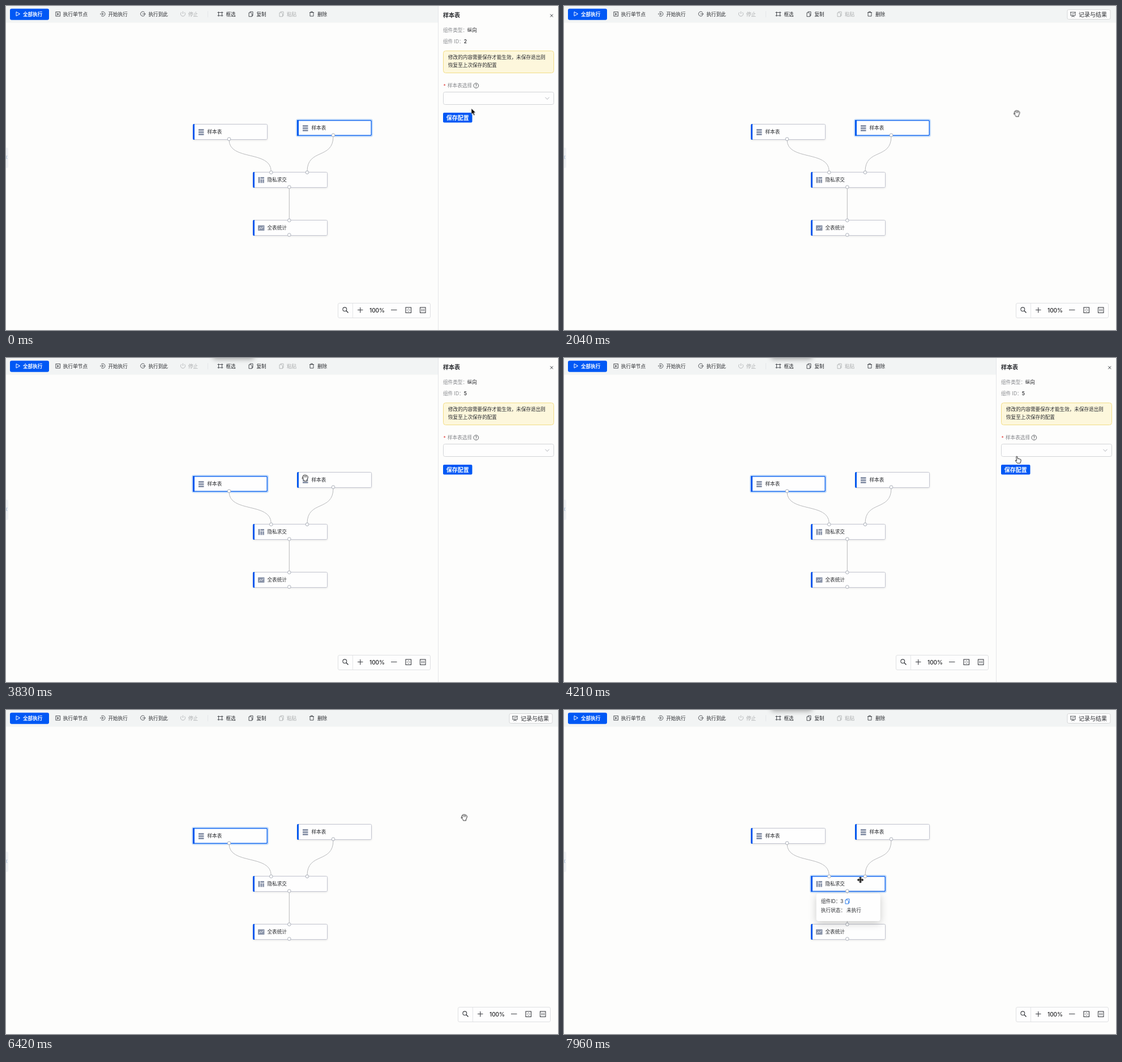
Write an HTML page that moves like this. It is 975 px wide and 574 px high and loops after 8 s.

```html
<!DOCTYPE html>
<html>
<head>
<meta charset="utf-8">
<style>
html, body { margin: 0; width: 100%; height: 100%; overflow: hidden; background: #fdfdfc; }
svg { display: block; }
text { font: 8.6px Inter, "Noto Sans CJK SC", "Noto Sans CJK", sans-serif; fill: #292b2f; }
.bold { font-weight: 600; }
.mid { font-size: 10px; }
.dark { font-weight: 500; fill: #1c1d20; }
.white { fill: #fff; }
.muted { fill: #85878b; }
.line { fill: none; stroke: #3c3f44; }
.off { opacity: .36; }
.edge { fill: none; stroke: #b7b8ba; }
.port { fill: #fff; stroke: #a9aeb8; }
.slate { fill: #8b95aa; }
.card { fill: #fefefe; filter: drop-shadow(0 4px 7px rgba(0, 0, 0, .2)); }
.glow { fill: none; stroke: #c3dcfa; stroke-width: 2; }
.focus { fill: none; stroke: #1a6cf0; stroke-width: 1.5; }

/* 1% of the loop is 80 ms */
svg [class*="a-"] { animation: 8s linear infinite; }
svg .a-slide { animation-name: slide; }
@keyframes slide {
  0%, 22.5%, 45%, 76.9% { transform: none; animation-timing-function: ease-in-out; }
  24.4%, 42.75%, 78.8%, 100% { transform: translateX(212px); animation-timing-function: ease-out; }
}
svg .a-toast { animation-name: toast; }
@keyframes toast {
  0%, 26.2%, 64.5%, 79.6% { transform: translateY(-18px); }
  29%, 62%, 82.4%, 100% { transform: none; }
}
svg .a-path { animation-name: path; }
@keyframes path {
  0% { transform: translate(822px, 181.5px); }
  4%, 10% { transform: translate(815px, 165px); animation-timing-function: ease-in-out; }
  14.4%, 16.9% { transform: translate(803px, 193px); }
  20.6%, 26.5% { transform: translate(799.5px, 190.5px); animation-timing-function: ease-in; }
  31.2% { transform: translate(640px, 212px); }
  32.75% { transform: translate(530px, 222px); }
  34.25% { transform: translate(400px, 232px); }
  35%, 44.5% { transform: translate(375.5px, 234px); animation-timing-function: ease-in-out; }
  52.625% { transform: translate(800px, 174px); }
  55%, 60.6% { transform: translate(802px, 166px); animation-timing-function: ease-in-out; }
  66.625%, 70% { transform: translate(805px, 223px); animation-timing-function: ease-in-out; }
  74.4%, 84.4% { transform: translate(809px, 190.5px); animation-timing-function: ease-in-out; }
  94%, 100% { transform: translate(523.5px, 301px); }
}

/* hard switches */
svg .a-arrow, svg .a-point, svg .a-grab, svg .a-move, svg .a-early, svg .a-late, svg .a-pick1, svg .a-pick2,
svg .a-sel1, svg .a-sel2, svg .a-sel3 { animation-timing-function: step-end; }
svg .a-arrow { animation-name: arrow; }
svg .a-point { animation-name: point; }
svg .a-grab { animation-name: grab; }
svg .a-move { animation-name: move; }
svg .a-early { animation-name: early; }
svg .a-late { animation-name: late; }
svg .a-pick1 { animation-name: pick1; }
svg .a-pick2 { animation-name: pick2; }
svg .a-sel1 { animation-name: sel1; }
svg .a-sel2 { animation-name: sel2; }
svg .a-sel3 { animation-name: sel3; }
@keyframes arrow { 0%, 50.5% { opacity: 1; } 1.6%, 52.1%, 100% { opacity: 0; } }
@keyframes point { 0%, 23.6%, 78% { opacity: 0; } 1.6%, 52.1% { opacity: 1; } 100% { opacity: 0; } }
@keyframes grab { 0%, 30.9%, 33.75%, 50.5%, 93% { opacity: 0; } 23.6%, 33.1%, 45.5%, 78% { opacity: 1; } 100% { opacity: 0; } }
@keyframes move { 0%, 33.1%, 45.5% { opacity: 0; } 30.9%, 33.75%, 93%, 100% { opacity: 1; } }
@keyframes early { 0% { opacity: 1; } 31%, 100% { opacity: 0; } }
@keyframes late { 0% { opacity: 0; } 31%, 100% { opacity: 1; } }
@keyframes pick1 { 0%, 25% { opacity: 0; } 15.6% { opacity: 1; } 100% { opacity: 0; } }
@keyframes pick2 { 0%, 80% { opacity: 0; } 68.5% { opacity: 1; } 100% { opacity: 0; } }
@keyframes sel1 { 0% { opacity: 1; } 42.5%, 100% { opacity: 0; } }
@keyframes sel2 { 0%, 96.9% { opacity: 0; } 42.5% { opacity: 1; } 100% { opacity: 0; } }
@keyframes sel3 { 0% { opacity: 0; } 96.9%, 100% { opacity: 1; } }

/* popups */
svg .a-menu { animation-name: menu; transform-origin: 870px 179px; }
@keyframes menu {
  0%, 6.2%, 17.3%, 56.8%, 70%, 100% { opacity: 0; transform: scaleY(.8); }
  8%, 15.6%, 58.6%, 68.2% { opacity: 1; transform: none; }
}
svg .a-ring { animation-name: ring; }
@keyframes ring {
  0%, 6%, 23%, 56.6%, 76%, 100% { opacity: 0; }
  7%, 21%, 57.5%, 74% { opacity: 1; }
}
svg .a-tip1, svg .a-tip2, svg .a-tip3 { transform-origin: 66px 30px; }
svg .a-tip1 { animation-name: tip1; }
svg .a-tip2 { animation-name: tip2; }
svg .a-tip3 { animation-name: tip3; }
@keyframes tip1 {
  0%, 32%, 36.3%, 100% { opacity: 0; transform: scale(.88); }
  33.4%, 34.6% { opacity: 1; transform: none; }
}
@keyframes tip2 {
  0%, 34.2%, 47.5%, 100% { opacity: 0; transform: scale(.88); }
  35.7%, 46% { opacity: 1; transform: none; }
}
@keyframes tip3 {
  0%, 93.7% { opacity: 0; transform: scale(.88); }
  95.3%, 100% { opacity: 1; transform: none; }
}
</style>
</head>
<body>
<svg width="975" height="574" viewBox="0 0 975 574">
  <defs>
    <g id="node">
      <rect x=".5" y=".5" width="131" height="27" rx="2" fill="#fefefe" stroke="#c3c5d0" style="filter:drop-shadow(0 1px 1.5px rgba(0,0,0,.1))"/>
      <path d="M3 0v28H2q-2 0-2-2V2Q0 0 2 0z" fill="#0058ee"/>
    </g>
    <g id="halo">
      <rect class="glow" x="-1" y="-1" width="134" height="30" rx="3"/>
      <rect class="focus" x=".75" y=".75" width="130.5" height="26.5" rx="1.5"/>
      <path d="M0 0h3v28H0z" fill="#0058ee"/>
    </g>
    <path id="table" class="slate" d="M10 9h9.5v3H10zM10 13h9.5v3H10zM10 17h9.5v3H10z"/>
    <path id="join" class="slate" d="M9.5 9h3v10.500h-3zM13.500 9H20v3h-6.500zM13.500 13h3v6.500h-3zM17.300 13H20v6.500h-2.700z"/>
    <g id="chart">
      <rect class="slate" x="9" y="9.5" width="11.5" height="9.5" rx=".8"/>
      <path d="M11 16.500l2.500-3 2 1.800 3.200-3.500" fill="none" stroke="#fff"/>
    </g>
    <g id="copy" fill="none">
      <path d="M2.500 1.800V.5h5v7H6"/>
      <path d="M.5 2.200h3.600L6 4v5H.5z"/>
    </g>
    <g id="tip">
      <rect class="card" x="9.700" y="31" width="113" height="49" rx="4"/>
      <text x="18" y="48">组件ID：</text>
      <text x="18" y="64.200">执行状态：</text>
      <text x="63" y="64.200">未执行</text>
      <use href="#copy" x="60.500" y="40.300" stroke="#2a7bea"/>
    </g>
  </defs>

  <rect width="975" height="574" fill="#fdfdfc"/>
  <path d="M0 251h1q3 0 3 3v30q0 3-3 3H0z" fill="#f1f3f5"/>
  <path d="M2 265l-2 3 2 3" fill="none" stroke="#8fa9cc" stroke-width=".8"/>

  <!-- toolbar -->
  <rect width="975" height="29.5" fill="#f2f4f4"/>
  <rect x="7" y="4.700" width="69" height="20" rx="3" fill="#0058f5"/>
  <path d="M18 10.300v7.400l6.500-3.700z" fill="none" stroke="#fff"/>
  <text class="bold white" x="30" y="17.800">全部执行</text>
  <g class="line" stroke-width=".9">
    <rect x="88" y="10.500" width="7.500" height="7.500"/>
    <path d="M90.500 12.200v4.200l3.300-2.100z" fill="#3c3f44" stroke="none"/>
    <path d="M168 11.400a4 4 0 1 1 0 5.400M166 14.100h6m-2-2l2 2-2 2"/>
    <path d="M244.600 11.200a4 4 0 1 0 .4 5M241 14.100h5m-1.800-2l2 2-2 2"/>
    <path d="M375.500 11.500h6V17h-6zM373.500 11.500h2m6 0h2M373.500 17h2m6 0h2M375.500 10v1.500m6-1.500v1.500M375.500 17v1.500m6-1.500v1.500"/>
    <use href="#copy" x="428.500" y="9.700"/>
    <path d="M536 11.500h8M538.500 11.500V10h3v1.500M537 11.500V18h6v-6.500"/>
  </g>
  <g class="line off" stroke-width=".9">
    <path d="M310 11a4 4 0 1 0 5 0M312.500 9.500V14"/>
    <use href="#copy" x="482.500" y="9.700"/>
  </g>
  <path d="M356.500 9v11" stroke="#e6e8ea"/>
  <text x="101" y="17.700">执行单节点</text>
  <text x="180.500" y="17.700">开始执行</text>
  <text x="251.500" y="17.700">执行到此</text>
  <text class="off" x="322" y="17.700">停止</text>
  <text x="388.500" y="17.700">框选</text>
  <text x="442.500" y="17.700">复制</text>
  <text class="off" x="496" y="17.700">粘贴</text>
  <text x="550" y="17.700">删除</text>
  <rect x="889" y="6.500" width="76" height="17" rx="2.500" fill="#fdfdfd" stroke="#d6d7d8"/>
  <path class="line" stroke-width=".9" d="M894 11h10M895 11v6h8v-6M899 17v2M896.500 19.500l2.500-2.500 2.500 2.500M897 15l1.500-1.500 1 1 1.800-2"/>
  <text class="mid" x="909" y="18.700">记录与结果</text>

  <rect class="a-toast" x="366" y="-32" width="72" height="31" rx="4" fill="#fefefe" style="filter:drop-shadow(0 3px 4px rgba(0,0,0,.32))"/>

  <!-- graph -->
  <path class="edge" d="M394 237C394 275 468.300 255 468.300 293"/>
  <path class="edge" d="M578 231C578 272 532 252 532 293"/>
  <path class="edge" d="M500.300 324v53"/>
  <g transform="translate(330 209)">
    <use href="#node"/><use class="a-sel2" href="#halo"/><use href="#table"/>
    <text x="25.500" y="17.300">样本表</text>
  </g>
  <g transform="translate(514 202)">
    <use href="#node"/><use class="a-sel1" href="#halo"/><use href="#table"/>
    <text x="25.500" y="17.300">样本表</text>
  </g>
  <g transform="translate(436 294)">
    <use href="#node"/><use class="a-sel3" href="#halo"/><use href="#join"/>
    <text x="25.500" y="17.300">隐私求交</text>
  </g>
  <g transform="translate(436 379)">
    <use href="#node"/><use href="#chart"/>
    <text x="25.500" y="17.300">全表统计</text>
  </g>
  <g class="port">
    <circle cx="394" cy="235.700" r="2.800"/>
    <circle cx="578" cy="228.700" r="2.800"/>
    <circle cx="468.300" cy="294.800" r="2.800"/>
    <circle cx="532" cy="294.800" r="2.800"/>
    <circle cx="500.300" cy="320.700" r="2.800"/>
    <circle cx="500.300" cy="379.800" r="2.800"/>
    <circle cx="500.300" cy="405.500" r="2.800"/>
  </g>
  <g transform="translate(514 202)"><g class="a-tip1"><use href="#tip"/><text x="52" y="48">2</text></g></g>
  <g transform="translate(330 209)"><g class="a-tip2"><use href="#tip"/><text x="52" y="48">5</text></g></g>
  <g transform="translate(436 294)"><g class="a-tip3"><use href="#tip"/><text x="52" y="48">3</text></g></g>

  <!-- zoom bar -->
  <g class="a-slide">
    <rect x="586.500" y="526.500" width="163" height="26" rx="2.500" fill="#fefefe" stroke="#dfe0e2"/>
    <path d="M612.500 527v25" stroke="#e4e5e7"/>
    <g class="line" stroke-width="1.100">
      <circle cx="598.300" cy="537.300" r="3.400"/>
      <path d="M600.800 539.800l3.700 3.700" stroke-width="1.500"/>
      <path d="M621 538.500h9.500M625.700 534v9.500M680 538.500h10.500"/>
      <rect x="706" y="534" width="9.500" height="9.500"/>
      <path d="M710.700 536v1.500m0 2.500v1.500M708 538.700h1.500m2.500 0h1.500" stroke-width=".9"/>
      <rect x="731.500" y="534" width="9.500" height="9.500"/>
      <path d="M734.500 536.500V541M738.200 536.500V541M736.300 537.500v.8m0 1.200v.8" stroke-width=".9"/>
    </g>
    <text class="mid dark" x="655.500" y="542.700" text-anchor="middle">100%</text>
  </g>

  <!-- drawer -->
  <g class="a-slide">
    <rect x="763.500" y="-1" width="214" height="576" fill="#fdfdfc" stroke="#e5e6e8"/>
    <text class="mid bold" x="772" y="20.200">样本表</text>
    <path class="line" d="M961.300 14.500l4.800 5M966.100 14.500l-4.800 5"/>
    <text class="muted" x="772" y="46.200">组件类型：</text>
    <text class="dark" x="814.700" y="46.200">纵向</text>
    <text class="muted" x="772" y="66">组件 ID：</text>
    <text class="dark a-early" x="808.700" y="66">2</text>
    <text class="dark a-late" x="808.700" y="66">5</text>
    <rect x="772.500" y="79.500" width="195" height="39" rx="4" fill="#fdf7dc" stroke="#f2dd86"/>
    <text x="781" y="94.300">修改的内容需要保存才能生效，未保存退出则</text>
    <text x="781" y="107.800">恢复至上次保存的配置</text>
    <text x="772.500" y="145" style="fill:#e2403c">*</text>
    <text class="muted" x="780" y="143.700">样本表选择</text>
    <circle class="line" cx="830.300" cy="141" r="4.400" stroke-width=".8"/>
    <text x="830.300" y="143.600" text-anchor="middle" style="font-size:7px">?</text>
    <rect x="772.500" y="152.500" width="195" height="22" rx="3" fill="#fefefe" stroke="#d2d4d7"/>
    <g class="a-ring">
      <rect class="glow" x="771.500" y="151.500" width="197" height="24" rx="4" style="stroke-width:1"/>
      <rect class="focus" x="772.500" y="152.500" width="195" height="22" rx="3" style="stroke:#3c86f0;stroke-width:1"/>
    </g>
    <path d="M952.500 161.700l3.500 3.700 3.500-3.700" fill="none" stroke="#b0b3b8"/>
    <text class="mid dark a-pick1" x="780" y="167.300">elina.csv</text>
    <text class="mid dark a-pick2" x="780" y="167.300">dan.csv</text>
    <rect x="772" y="189" width="51.500" height="17.500" rx="2" fill="#0058f5"/>
    <text class="mid bold white" x="777.800" y="201.600">保存配置</text>
    <g class="a-menu">
      <rect class="card" x="772" y="179" width="196" height="50" rx="4" style="fill:#fbfbfa"/>
      <rect class="a-early" x="774" y="181" width="192" height="22.500" rx="2" fill="#f6f6f6"/>
      <rect class="a-late" x="774" y="204.500" width="192" height="22.500" rx="2" fill="#f6f6f6"/>
      <text class="mid dark" x="783.700" y="195.500">elina.csv</text>
      <text class="mid dark" x="783.700" y="218.300">dan.csv</text>
    </g>
  </g>

  <!-- pointer -->
  <g class="a-path">
    <path class="a-arrow" d="M0 0v10.500l2.500-2.200 1.800 4 1.800-.8-1.800-3.900h3.400z" fill="#000" stroke="#fff" stroke-width=".6"/>
    <path class="a-point" d="M-1.300.8q1-1.300 2 0l1 4 1.300-.5.700.7 1.300-.3.600.9q1.400-.5 1.500 1l-.2 2.500-1 3.200H.5l-3.300-4.500q0-1.500 1.800-.2l.5.400z" fill="#fff" stroke="#111" stroke-width=".9"/>
    <g class="a-grab" fill="#fff" stroke="#111" stroke-width=".9">
      <path d="M-2.700.8l-1.500-3.400q.5-1.500 1.600-.4l-.1-1.400q.9-1.500 1.800-.3.900-1.700 1.900 0 1.300-1 1.700.5 1.600-.6 1.600.9l1.100.7-.5 3.300-1.400 2.500v2.100h-4.800l-.8-1.800-3.200-3.300q.5-1.400 2.600.6z"/>
      <path d="M-1-4l.6 3M1-4v3M2.800-3.500l-.3 2.700" stroke-width=".6"/>
    </g>
    <path class="a-move" d="M0-5.500l2.300 2.500H.8v2.200H3v-1.500L5.500 0 3 2.300V.8H.8V3h1.500L0 5.500-2.300 3h1.500V.8H-3v1.500L-5.500 0-3-2.300v1.500h2.200V-3h-1.500z" fill="#000" stroke="#000" stroke-width=".4"/>
  </g>
</svg>
</body>
</html>
```
